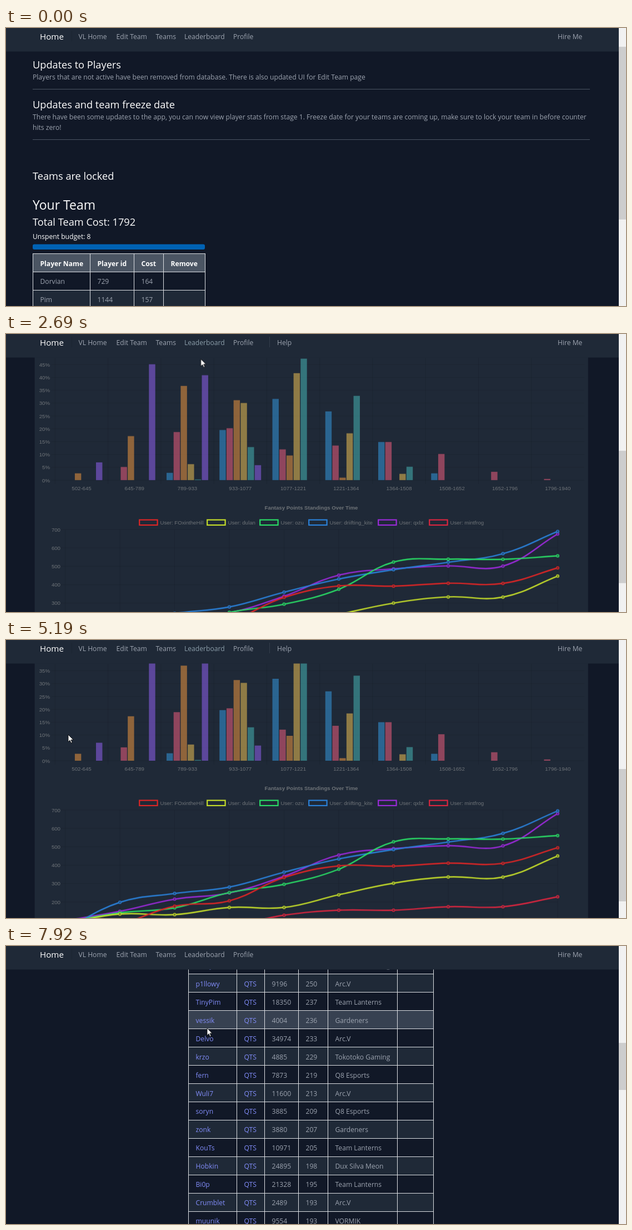
An HTML page that plays this animation: 1116 by 502 pixels, repeating every 7.99 s.

```html
<!DOCTYPE html>
<html lang="en">
<head>
<meta charset="utf-8">
<title>Fantasy League</title>
<style>
@property --y { syntax: "<integer>"; inherits: true; initial-value: 0; }
html, body { margin: 0; width: 100%; height: 100%; overflow: hidden; background: #111827; }
svg { display: block; width: 1116px; height: 502px; }
text { font: 12.13px "Open Sans", "Noto Sans", sans-serif; fill: #9ca3af; white-space: pre; }
.h1 { font-size: 22.95px; fill: #fff; }
.h2 { font-size: 18.2px; fill: #fff; }
.white { fill: #fff; }
.bold { font-weight: 700; }
.head { font-weight: 700; fill: #fff; }
.link { fill: #818cf8; }
.brand { font-size: 15.15px; fill: #fff; }
.chart { font: 9.67px "Liberation Sans", Arial, sans-serif; fill: #6e7378; }
.title { font-weight: 700; }
.mid { text-anchor: middle; }
.end { text-anchor: end; }
.rule { stroke: #4b5563; }
.grid { stroke: rgba(0, 0, 0, .1); }
.curve, .dot { fill: none; stroke-linecap: round; vector-effect: non-scaling-stroke; }
.curve { stroke-width: 2.4px; }
.dot { stroke-width: 6px; }
.core { stroke: #1f2937; stroke-opacity: .55; stroke-width: 3.6px; }

.page, .help, .row-hot, #nav text, #arrow, #hand {
  animation: 7.99s step-end infinite;
}
.body { transform: translateY(calc(var(--y) * -1px)); }
.thumb { fill: #cdcdcd; transform: translateY(calc(var(--y) / var(--ratio) * 1px)); }
#home { animation: show-home 7.99s step-end infinite, scroll-home 7.99s ease-in-out infinite; }
#board { animation: show-board 7.99s step-end infinite, scroll-board 7.99s linear infinite; }
#teams { --y: 59; animation-name: show-teams; }
#edit { animation: show-edit 7.99s step-end infinite, scroll-edit 7.99s ease-in-out infinite; }
.help { animation-name: show-help; }
.row-hot { fill: #374151; animation-name: show-row; }
#nav .leaderboard { animation-name: hot-board; }
#nav .teams { animation-name: hot-teams; }
#nav .edit-team { animation-name: hot-edit; }
.grow { animation: grow 7.99s linear infinite; }
#cursor { animation: move 7.99s ease-in-out infinite; }
#cursor path { fill: #fff; stroke: #000; stroke-width: .8px; stroke-linejoin: round; }
#arrow { animation-name: show-arrow; }
#hand { animation-name: show-hand; }

@keyframes show-home { 0% { opacity: 1 } 24.03%, 100% { opacity: 0 } }
@keyframes show-board { 0% { opacity: 0 } 24.03% { opacity: 1 } 78.6%, 100% { opacity: 0 } }
@keyframes show-teams { 0% { opacity: 0 } 78.6% { opacity: 1 } 87.86%, 100% { opacity: 0 } }
@keyframes show-edit { 0% { opacity: 0 } 87.86%, 100% { opacity: 1 } }
@keyframes show-help { 0% { opacity: 0 } 24.03% { opacity: 1 } 87.86%, 100% { opacity: 0 } }
@keyframes show-row { 0% { opacity: 0 } 98.7%, 100% { opacity: 1 } }
@keyframes show-hand {
  0% { opacity: 0 } 18.5% { opacity: 1 } 30.7% { opacity: 0 } 73.2% { opacity: 1 }
  83.5% { opacity: 0 } 85.4% { opacity: 1 } 91.5%, 100% { opacity: 0 }
}
@keyframes show-arrow {
  0% { opacity: 0 } 12.9% { opacity: 1 } 18.5% { opacity: 0 } 30.7% { opacity: 1 }
  73.2% { opacity: 0 } 83.5% { opacity: 1 } 85.4% { opacity: 0 } 91.5%, 100% { opacity: 1 }
}
@keyframes hot-board { 0% { fill: #9ca3af } 18.5% { fill: #fff } 30.7% { fill: #8b9da9 } 78.6%, 100% { fill: #9ca3af } }
@keyframes hot-teams { 0% { fill: #9ca3af } 73.2% { fill: #fff } 83.5%, 100% { fill: #9ca3af } }
@keyframes hot-edit { 0% { fill: #9ca3af } 85.4% { fill: #fff } 91.5%, 100% { fill: #9ca3af } }
@keyframes scroll-home { 0%, 2.38% { --y: 57 } 15.5%, 100% { --y: 294 } }
@keyframes scroll-board {
  0%, 30% { --y: 515; animation-timing-function: ease-in }
  38.92% { --y: 191 }
  44.06% { --y: 90; animation-timing-function: ease-out }
  46.56%, 55.07% { --y: 0; animation-timing-function: ease-in-out }
  64.95% { --y: 488; animation-timing-function: ease-out }
  68.84%, 100% { --y: 515 }
}
@keyframes scroll-edit { 0%, 91.36% { --y: 117 } 99.1%, 100% { --y: 1035 } }
@keyframes grow {
  0%, 24.58% { transform: scaleY(.001); animation-timing-function: cubic-bezier(.25, 1, .5, 1) }
  37.1%, 100% { transform: none }
}
@keyframes move {
  0%, 12.9% { transform: translate(470px, 330px) }
  19%, 24% { transform: translate(350px, 5px) }
  27.5% { transform: translate(354px, 15px) }
  31% { transform: translate(354px, 20px) }
  38.92% { transform: translate(340px, 126px) }
  51.06% { transform: translate(44px, 169px) }
  54.5%, 55.3% { transform: translate(11px, 180px) }
  64.95% { transform: translate(112px, 171px) }
  73.6% { transform: translate(272px, 10px) }
  76.8% { transform: translate(273px, 6px) }
  79.4%, 82% { transform: translate(278.5px, 15px) }
  86.5% { transform: translate(228px, 14px) }
  90.5% { transform: translate(228px, 18px) }
  99.1%, 100% { transform: translate(362px, 148.5px) }
}
</style>
</head>
<body>
<svg id="stage" viewBox="0 0 1116 502"></svg>
<script>
const ROW = 32.95, EDGE = "#dcdfe3";
const stage = document.getElementById("stage");

function el(parent, tag, attrs = {}, content) {
  const node = document.createElementNS("http://www.w3.org/2000/svg", tag);
  for (const key in attrs) node.setAttribute(key, attrs[key]);
  if (content !== undefined) node.textContent = content;
  parent.appendChild(node);
  return node;
}
const text = (g, x, y, str, cls = "") => el(g, "text", { x, y: Math.round(y), class: cls }, str);
const box = (g, x, y, width, height, fill) => el(g, "rect", { x, y, width, height, fill });
const line = (g, x1, y1, x2, y2, cls) => el(g, "line", { x1, y1, x2, y2, class: cls });

// A page with its scrollbar; content is laid out as seen when scrolled by "shift".
function page(id, thumb, ratio, shift) {
  const root = el(stage, "g", { id, class: "page", style: `--ratio:${ratio}` });
  box(root, 0, 0, 1116, 502, "#111827");
  const body = el(root, "g", { class: "body" });
  box(root, 1103, 0, 13, 502, "#f1f1f1");
  el(root, "rect", { class: "thumb", x: 1103, y: -2, width: 13, height: thumb });
  return el(body, "g", { transform: `translate(0 ${shift})` });
}

// Borders are filled boxes on whole pixels, so they stay one pixel wide.
function table(g, xs, y, head, rows, opt = {}) {
  const left = xs[0], width = xs[xs.length - 1] - left;
  const top = i => Math.floor(y + ROW * i);
  const band = (i, fill) => box(g, left, top(i), width, top(i + 1) - top(i), fill);
  if (!opt.plain) {
    band(0, "#4b5563");
    rows.forEach((r, i) => i % 2 && band(i + 1, "#1f2937"));
  }
  if (opt.hot) band(opt.hot + 1).setAttribute("class", "row-hot");
  head.forEach((str, i) => opt.plain
    ? text(g, (xs[i] + xs[i + 1]) / 2 + .5, y + 22.5, str, "bold mid")
    : text(g, xs[i] + 13.5, y + 22.5, str, "head"));
  rows.forEach((row, r) => row.forEach((str, i) =>
    text(g, xs[i] + 13.5, y + ROW * (r + 1) + 22, str, i < opt.links ? "link" : "")));
  const last = rows.length + 1;
  for (let i = 0; i <= last; i++) box(g, left, top(i), width + 1, 1, EDGE);
  xs.forEach(x => box(g, x, top(0), 1, top(last) - top(0), EDGE));
}

function teamBlock(g, x, y) {
  text(g, x, y, "Your Team", "h1");
  text(g, x, y + 29, "Total Team Cost: 1792", "h2");
  text(g, x, y + 53, "Unspent budget: 8", "white");
  box(g, x, y + 62.5, 310, 9.5, "#0062b4").setAttribute("rx", 3);
  table(g, [0, 103, 182, 235, 310].map(v => x + v), y + 79.5,
    ["Player Name", "Player id", "Cost", "Remove"],
    [["Dorvian", 729, 164], ["Pim", 1144, 157], ["rusko", 8480, 375],
     ["nubby", 7716, 368], ["Wuli7", 11600, 370], ["zonk", 3880, 358]]);
}

// Home
const home = page("home", 312, 1.59, 57);
text(home, 48, 73, "Updates to Players", "h2");
text(home, 48, 93, "Players that are not active have been removed from database. There is also updated UI for Edit Team page");
line(home, 48, 110.5, 1051, 110.5, "rule");
text(home, 48, 145, "Updates and team freeze date", "h2");
text(home, 48, 165, "There have been some updates to the app, you can now view player stats from stage 1. Freeze date for your teams are coming up, make sure to lock your team in before counter");
text(home, 48, 184, "hits zero!");
line(home, 48, 201.5, 1051, 201.5, "rule");
text(home, 48, 274, "Teams are locked", "h2");
teamBlock(home, 48, 328);

// Leaderboard
const users = { q: "qxbt", o: "ozu", d: "dulan", f: "FOxintheHill", k: "driifting_kite", m: "mintfrog" };
const board = page("board", 239, 2.077, 0);
text(board, 51.5, 98, "About Standings Stats", "h1");
text(board, 51.5, 129, 'This pages shows the standings of players in this Fantasy League. Points are the sum of the kills that each Fantasy League player"s team"s players got in the turnament.');
table(board, [51, 153, 237], 152.1, ["User ID", "Total Kills"],
  [[users.k, 695], [users.q, 681], [users.o, 561], [users.f, 495], [users.d, 450], [users.m, 228]], { plain: true });
box(board, 51.6, 415, 996.2, 680, "#1f2937");

function barChart(g) {
  const base = 706, unit = 4.64, pitch = 95.25, slot = 12.7;
  const series = [
    ["q", "54,162,235", 317], ["o", "255,99,132", 383], ["d", "255,159,64", 446],
    ["f", "255,206,86", 515], ["k", "75,192,192", 611], ["m", "153,102,255", 710.5]];
  const bins = [502, 645, 789, 933, 1077, 1221, 1364, 1508, 1652, 1796, 1940];
  const share = [
    [0, 0, 2.7, 0, 0, 7], [0, 5.2, 17.3, 0, 0, 45.5], [2.9, 18.9, 37, 6.3, .3, 41.2],
    [19.7, 20.4, 31.4, 30.3, 13, 5.9], [31.9, 12.1, 9.7, 42, 47.7], [27, 13.6, 1, 18.4, 33.1],
    [15, 15, 0, 2.5, 5.3], [2.7, 10.3], [0, 3.3], [0, .5]];
  text(g, 549.5, 438.5, "Projected Fantasy Point Distribution", "chart title mid");
  series.forEach(([id, rgb, x]) => {
    box(g, x, 457, 33, 10, `rgba(${rgb},.5)`);
    text(g, x + 37, 465, users[id], "chart");
  });
  for (let p = 0; p <= 50; p += 5) {
    line(g, 81, base - p * unit, 1041, base - p * unit, "grid");
    text(g, 79, base - p * unit + 3.5, p + "%", "chart end");
  }
  const bars = el(el(g, "g", { transform: `translate(0 ${base})` }), "g", { class: "grow" });
  share.forEach((row, c) => {
    const mid = 136 + c * pitch;
    line(g, mid - pitch / 2, 474, mid - pitch / 2, base + 7, "grid");
    text(g, mid, 724, bins[c] + "-" + bins[c + 1], "chart mid");
    row.forEach((v, s) => v && box(bars, mid - 3 * slot + s * slot + .6, -v * unit, 11.43, v * unit, `rgba(${series[s][1]},.5)`));
  });
}

// Smooth path through the points with a tension of 0.4.
function spline(pts) {
  const ctrl = pts.map((p, i) => {
    const a = pts[i - 1] || p, b = pts[i + 1] || p;
    const da = Math.hypot(p[0] - a[0], p[1] - a[1]), db = Math.hypot(b[0] - p[0], b[1] - p[1]);
    const at = k => [p[0] + k * (b[0] - a[0]), p[1] + k * (b[1] - a[1])];
    return { before: at(-.4 * da / (da + db)), after: at(.4 * db / (da + db)) };
  });
  return pts.map((p, i) => i ? `C${ctrl[i - 1].after} ${ctrl[i].before} ${p}` : `M${p}`).join("");
}

function lineChart(g) {
  const base = 1027.4, unit = .332, left = 106.5, pitch = 98.5;
  const series = [
    ["f", "#dc2626", 239, [30, 80, 177, 206, 333, 396, 395, 411, 410, 495]],
    ["d", "#c4dc2a", 361, [84, 134, 131, 170, 170, 239, 302, 336, 335, 450]],
    ["o", "#2adc66", 456, [89, 141, 168, 251, 296, 378, 527, 543, 542, 561]],
    ["k", "#2a80d8", 544, [52, 198, 246, 281, 362, 434, 485, 526, 573, 695]],
    ["q", "#9a2ad8", 669, [98, 149, 215, 249, 340, 455, 490, 506, 505, 681]],
    ["m", "#d8263f", 761, [15, 30, 59, 70, 128, 155, 155, 174, 174, 228]]];
  text(g, 549.5, 759, "Fantasy Points Standings Over Time", "chart title mid");
  for (let v = 0; v <= 700; v += 100) {
    line(g, 99, base - v * unit, 993, base - v * unit, "grid");
    text(g, 98, base - v * unit + 3.5, v, "chart end");
  }
  for (let i = 0; i < 10; i++) line(g, left + i * pitch, 795, left + i * pitch, base + 7, "grid");
  const plot = el(el(g, "g", { transform: `translate(0 ${base})` }), "g", { class: "grow" });
  series.slice().reverse().forEach(([id, stroke, x, values]) => {
    const pts = values.map((v, i) => [left + i * pitch, -v * unit]);
    const dots = pts.map(p => `M${p}h.01`).join("");
    el(plot, "path", { d: spline(pts), stroke, class: "curve" });
    el(plot, "path", { d: dots, stroke, class: "dot" });
    el(plot, "path", { d: dots, class: "dot core" });
    el(g, "rect", { x: x + 1.2, y: 777.6, width: 32.4, height: 9.4, fill: "none", stroke, "stroke-width": 2.2 });
    text(g, x + 38.5, 785.5, "User: " + users[id], "chart");
  });
}
barChart(board);
lineChart(board);

// Teams
const teams = page("teams", 127, 3.92, 59);
const roster = (y, name, rows) => {
  text(teams, 58, y - 5.5, "User: " + name, "h2");
  table(teams, [58, 161, 240, 304], y, ["Player Name", "Player id", "Points"], rows);
};
roster(110.3, users.f, [["milovk", 1265, 70], ["zonk", 3880, 67], ["vessik", 4004, 88],
  ["Tibbbo", 7378, 126], ["nubby", 7716, 81], ["Wuli7", 11600, 63]]);
roster(386.6, users.d, [["Pim", 1144, 39], ["nubby", 7716, 81], ["rusko", 8480, 31]]);

// Edit team
const edit = page("edit", 85, 5.85, 1035);
teamBlock(edit, 67, -820);
const clubs = ["Arc.V", "Team Lanterns", "Gardeners", "Tokotoko Gaming", "Q8 Esports", "Dux Silva Meon", "VORMIK"];
const players = [
  ["Tibbbo", 7378, 318, 2], ["milovk", 1265, 301, 2], ["ruvelo", 9554, 288, 1], ["nubby", 7716, 279, 4],
  ["Dorvian", 729, 268, 2], ["Pim", 1144, 259, 1], ["dorry", 6120, 254, 3],
  ["p1llowy", 9196, 250, 0], ["TinyPim", 18350, 237, 1], ["vessik", 4004, 236, 2], ["Delvo", 34974, 233, 0],
  ["krzo", 4885, 229, 3], ["fern", 7873, 219, 4], ["Wuli7", 11600, 213, 0], ["soryn", 3885, 209, 4],
  ["zonk", 3880, 207, 2], ["KouTs", 10971, 205, 1], ["Hobkin", 24895, 198, 5], ["Bi0p", 21328, 195, 1],
  ["Crumblet", 2489, 193, 0], ["muunik", 9554, 193, 6]];
// The row at index 7 sits at 50.8, below seven rows and the heading.
table(edit, [328, 415, 465, 526, 579, 704, 769], 50.8 - 8 * ROW,
  ["Player", "Link", "Id", "Kills", "Team", "Add"],
  players.map(([name, id, kills, club]) => [name, "QTS", id, kills, clubs[club]]),
  { links: 2, hot: 9 });

// Navigation bar
const nav = el(stage, "g", { id: "nav" });
box(nav, 0, 0, 1103, 42.5, "#1f2937");
text(nav, 61, 21, "Home", "brand");
line(nav, 118.5, 5, 118.5, 24, "grid");
[["VL Home", 130.5], ["Edit Team", 198.5], ["Teams", 269.5], ["Leaderboard", 321], ["Profile", 409], ["Hire Me", 993]]
  .forEach(([str, x]) => text(nav, x, 20, str, str.toLowerCase().replace(" ", "-")));
const help = el(nav, "g", { class: "help" });
line(help, 474.5, 5, 474.5, 24, "rule").style.opacity = .5;
text(help, 488, 20, "Help");

// Pointer
const cursor = el(stage, "g", { id: "cursor" });
el(cursor, "path", { id: "arrow", d: "M0 0v13l3-3 2.2 5 2-.9-2.2-4.9h4.2z" });
el(el(cursor, "g", { transform: "translate(-5.5 -1)" }), "path", {
  id: "hand",
  d: "M4 2q1.5-2 3 0V7q2-1 2.6.4 2-.6 2.6.6 2-.2 1.8 2v4q-.5 2.5-2 4.5H6Q4 16 1 11.5q0-2 1.8-1.2L4 11.5z"
});
</script>
</body>
</html>
```
